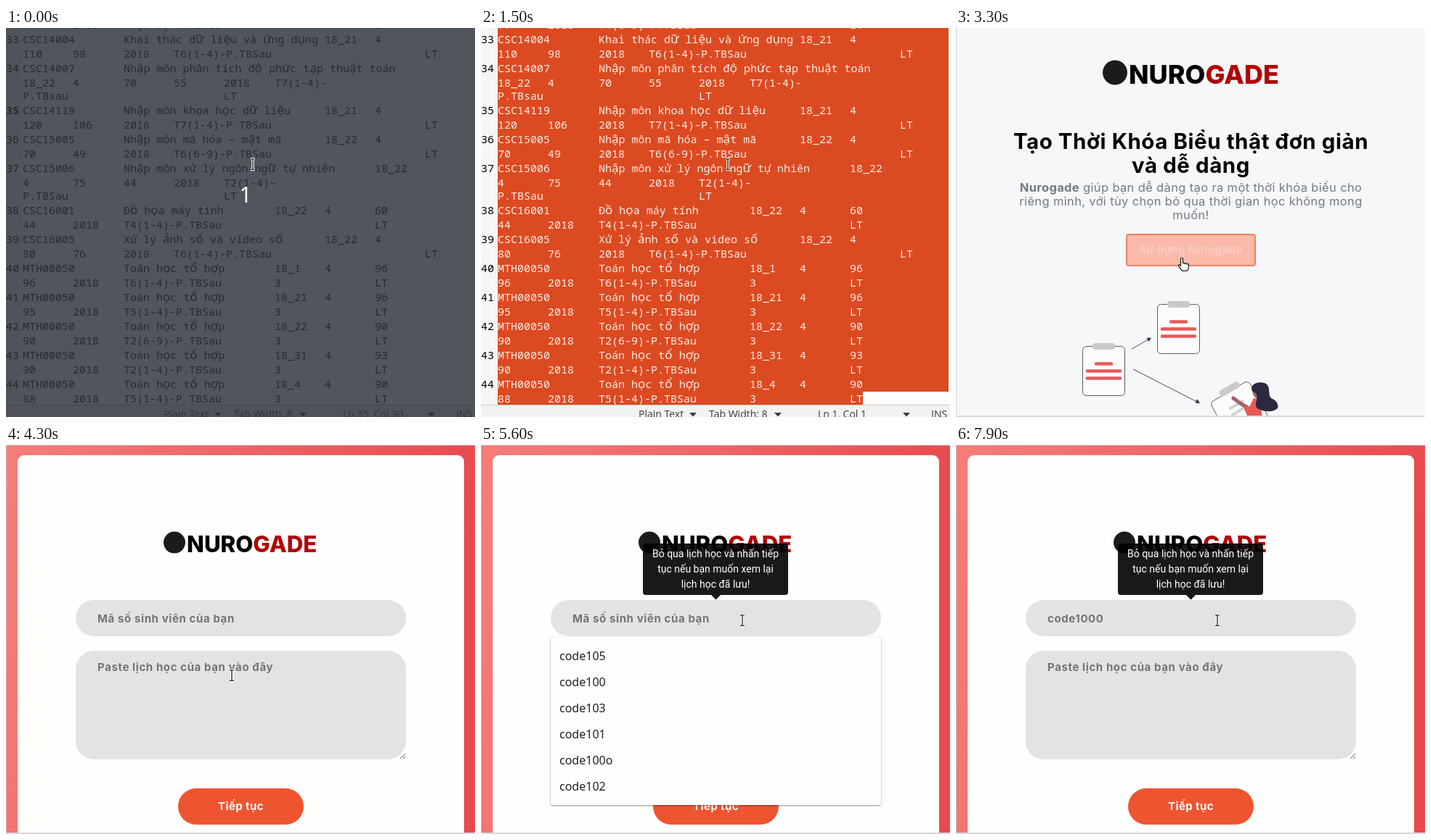
Animation, 646 px wide and 537 px high, one loop 8000 ms. Source, as an HTML page:

```html
<!DOCTYPE html>
<html lang="vi">
<head>
<meta charset="utf-8">
<title>Thời khóa biểu</title>
<style>
html, body { margin: 0; width: 100%; height: 100%; overflow: hidden; background: #fff; }
svg { display: block; width: 646px; height: 537px; }
text { white-space: pre; }
.mono { font: 500 15px "Noto Sans Mono", monospace; }
.mono .vn { font: 500 17px "Noto Sans", sans-serif; }
.bar { font: 500 14px "Open Sans", sans-serif; fill: #3c3c3c; }
.page { font-family: Inter, sans-serif; }
.logo { font-weight: 800; }
.title { font-size: 29.5px; font-weight: 700; letter-spacing: .55px; text-anchor: middle; }
.lead { font-size: 16.5px; letter-spacing: .35px; text-anchor: middle; fill: #737b82; }
.field { font-size: 15px; font-weight: 700; letter-spacing: .6px; fill: #737478; }
.btn { font-size: 15px; font-weight: 700; letter-spacing: .4px; text-anchor: middle; }
.tip { font: 14px Roboto, sans-serif; text-anchor: middle; fill: #fff; }
.item { font: 500 16px "Noto Sans", sans-serif; fill: #202124; }
</style>
</head>
<body>
<svg id="stage" viewBox="0 0 646 537"></svg>
<script>
const LOOP = 8000, STEP = 100, ORANGE = '#ef5430';
const stage = document.getElementById('stage');
const $ = id => document.getElementById(id);

const rect = (x, y, w, h, fill, rx = 0, more = '') =>
  `<rect x="${x}" y="${y}" width="${w}" height="${h}" rx="${rx}" fill="${fill}" ${more}/>`;
const text = (x, y, s, cls = '', more = '') =>
  `<text x="${x}" y="${y}" class="${cls}" ${more}>${s}</text>`;
const path = (d, more = 'fill="none"') => `<path d="${d}" ${more}/>`;

// ---- text editor: each cell starts with its tab column ----
const ROWS = [
  '33#0CSC14004|2Khai thác dữ liệu và ứng dụng|618_21|74',
  '0110|198|22018|3T6(1-4)-P.TBSau|8LT',
  '34#0CSC14007|2Nhập môn phân tích độ phức tạp thuật toán',
  '018_22|14|270|355|42018|5T7(1-4)-',
  '0P.TBsau|4LT',
  '35#0CSC14119|2Nhập môn khoa học dữ liệu|618_21|74',
  '0120|1106|22018|3T7(1-4)-P.TBSau|8LT',
  '36#0CSC15005|2Nhập môn mã hóa – mật mã|618_22|74',
  '070|149|22018|3T6(6-9)-P.TBSau|8LT',
  '37#0CSC15006|2Nhập môn xử lý ngôn ngữ tự nhiên|718_22',
  '04|175|244|32018|4T2(1-4)-',
  '0P.TBSau|4LT',
  '38#0CSC16001|2Đồ họa máy tính|518_22|64|760',
  '044|12018|2T4(1-4)-P.TBSau|7LT',
  '39#0CSC16005|2Xử lý ảnh số và video số|618_22|74',
  '080|176|22018|3T6(1-4)-P.TBSau|8LT'
];
[['18_1', 96, 96, 'T6(1-4)'], ['18_21', 96, 95, 'T5(1-4)'], ['18_22', 90, 90, 'T2(6-9)'],
 ['18_31', 93, 90, 'T2(1-4)'], ['18_4', 90, 88, 'T5(1-4)']].forEach(([group, max, now, slot], i) =>
  ROWS.push(`${40 + i}#0MTH00050|2Toán học tổ hợp|5${group}|64|7${max}`,
            `0${now}|12018|2${slot}-P.TBSau|53|7LT`));

const viet = s => s.replace(/[ậạộệứụọổợảốồữ]/g, '<tspan class="vn">$&</tspan>');
const cells = (row, y) => row.split('|').map(c =>
  text(Math.round(23 + 69.3 * c[0]), y, viet(c.slice(1)))).join('');

function editor() {
  let y = 1, body = cells('077|12018|2T4(6-9)-P.TBSau|7LT', y), nums = '';
  for (const row of ROWS) {
    y += row.startsWith('0P.') ? 18 : 20;
    const [num, rest] = row.includes('#') ? row.split('#') : ['', row];
    if (num) nums += text(0, y, num, '', `id="n${num}"`);
    body += cells(rest, y);
  }
  const arrow = x => path(`M${x} 531h10l-5 5.5z`, 'fill="#3c3c3c"');
  return `<g id="editor">${rect(0, 0, 646, 537, '#fefefe') + rect(0, 0, 21, 520, '#f7f6f5')}
    <rect id="band" x="0" width="646" fill="#edecea"/>
    <path id="sel" d="M23 0H644V502H526V520H23z" fill="#dc4a21"/>
    <g class="mono">${nums}<g id="code">${body}</g></g>
    ${rect(343.4, 185, 1.2, 19, '#111', 0, 'id="edCaret"')}
    ${rect(0, 520, 646, 17, '#f3f2f0') + rect(0, 520, 646, 1, '#cdc9c4')}
    <g class="bar">${text(217, 538, 'Plain Text') + text(314, 538, 'Tab Width: 8') +
      text(464, 538, '', '', 'id="pos"') + text(620, 538, 'INS')}</g>
    ${arrow(287) + arrow(404) + arrow(581)}
    <g id="dim">${rect(0, 0, 646, 537, '#2b3139', 0, 'opacity=".82"')}
      ${text(330, 241, '1', '', 'font-family="Noto Sans, sans-serif" font-size="30" fill="#fff" text-anchor="middle"')}</g>
  </g>`;
}

const logo = (x, y, size, r) => `<circle cx="${x - r - 2}" cy="${y - size * .43}" r="${r}" fill="#1c1a1a"/>` +
  text(x, y, 'NURO<tspan fill="#b00508">GADE</tspan>', 'logo', `font-size="${size}"`);

// ---- landing page ----
const board = (x, y) => `<g transform="translate(${x} ${y})">
  ${rect(.5, 4.5, 58, 68, '#fbfbfc', 5, 'stroke="#5a5a66"') + rect(14, 0, 31, 9, '#c9c9c9', 4)}
  ${path('M19 28.500h21M7 38.500h45M7 48.500h45', 'stroke="#e85a58" stroke-width="4.500" stroke-linecap="round"')}</g>`;

function landing() {
  return `<g id="landing" class="page">${rect(0, 0, 646, 537, '#f6f7f9') + rect(0, 0, 1, 537, '#d6d8db')}
    ${logo(238, 77, 36, 17)}
    ${text(323.5, 167, 'Tạo Thời Khóa Biểu thật đơn giản', 'title')}
    ${text(323.5, 200, 'và dễ dàng', 'title')}
    ${text(323.5, 225.5, '<tspan font-weight="700">Nurogade</tspan> giúp bạn dễ dàng tạo ra một thời khóa biểu cho', 'lead')}
    ${text(323.5, 244.5, 'riêng mình, với tùy chọn bỏ qua thời gian học không mong', 'lead')}
    ${text(323.5, 263.5, 'muốn!', 'lead')}
    ${rect(235, 285, 177, 43, '#ff7551', 3, 'id="cta" stroke="#f1805f" stroke-width="2"')}
    ${text(323.5, 311, 'Sử dụng Nurogade', 'btn', 'id="ctaText"')}
    ${board(277, 377) + board(174, 435)}
    ${path('M242 443L264 430.500M244 471L331 515.500', 'stroke="#4a4a58"')}
    ${path('M269 427.500l-3.500 5.500-3-5zM336 518l-6.500-.5 2.800-5.200z', 'fill="#2f2e41"')}
    ${path('M362 540L352 521Q351 517 354 515L398 489Q402 487 405 491L432 540z', 'fill="#fbfbfc" stroke="#5a5a66"')}
    ${rect(-15, -4.5, 30, 9, '#c9c9c9', 4, 'transform="translate(376.5 498.500) rotate(-30)"')}
    ${path('M378 525l17-10M381 534l20-12', 'stroke="#d2d2d4" stroke-width="4" stroke-linecap="round"')}
    ${path('M382 511l8 6 13 8', 'fill="none" stroke="#a0616a" stroke-width="5" stroke-linecap="round" stroke-linejoin="round"')}
    ${path('M399 521L404 523 410 511 418 512 422 537H402L397 526z', 'fill="#e85a58"')}
    ${path('M408 498q0 9 5 13l6-6-3-8z', 'fill="#a0616a"')}
    ${path('M407 497C408 490 419 487 427 491C434 496 429 505 434 511C441 514 445 519 443 525C437 531 422 530 415 525C410 519 416 512 414 506C412 502 407 503 407 497z', 'fill="#2b2940"')}
    ${rect(0, 535, 646, 2, '#d9dbde')}</g>`;
}

// ---- form page ----
function form() {
  const tips = ['Bỏ qua lịch học và nhấn tiếp', 'tục nếu bạn muốn xem lại', 'lịch học đã lưu!'];
  const items = [0, 1, 2, 3, 4, 5].map(i => text(108, 297 + 36 * i, '', 'item', `id="item${i}"`)).join('');
  return `<g id="form" class="page">${rect(0, 0, 646, 537, 'url(#red)')}
    ${path('M0 .5H646M.5 0V537', 'stroke="#d9a5a5"')}
    ${rect(16, 14, 615, 540, '#fefefd', 9) + logo(249, 148, 31.2, 15)}
    ${rect(96, 214, 455, 50, '#e5e3e2', 25) + rect(96, 284, 455, 150, '#e5e3e2', 25)}
    ${text(126, 245, '', 'field', 'id="typed"') + text(126, 312, 'Paste lịch học của bạn vào đây', 'field')}
    ${path('M543 433l7-7M547 433l3-3', 'stroke="#555"')}
    ${rect(237, 474, 173, 50, ORANGE, 25) + text(323.5, 504, 'Tiếp tục', 'btn', 'fill="#fff"')}
    ${rect(126, 230, 1, 19, '#333', 0, 'id="caret"')}
    <g id="tip">${path('M227 136H419Q423 136 423 140V203Q423 207 419 207H330L323.500 213.500 317 207H227Q223 207 223 203V140Q223 136 227 136z', 'opacity=".9"')}
      ${tips.map((s, i) => text(323, 155 + 21 * i, s, 'tip')).join('')}</g>
    <g id="list">${rect(96, 265, 455, 232, '#fefefe', 2, 'filter="url(#shade)"') + items}</g>
    ${rect(0, 535, 646, 2, '#d9d6d9')}</g>`;
}

const BEAM = 'M-3 -7.500Q0 -7.500 0 -6Q0 -7.500 3 -7.500M0 -6V6M-3 7.500Q0 7.500 0 6Q0 7.500 3 7.500';
const HAND = 'M-1.500 1c0-2 3-2 3 0v6c.5-1 2.500-1 2.800.3c.6-.9 2.500-.7 2.700.6c.7-.7 2.400-.3 2.400 1.200v3c0 3-1.500 4.500-2 5h-7c-1-2-4-4.500-5-6.500c-.7-1.500 1.200-2.300 2.200-1.200l.9 1z';

stage.innerHTML = `<defs>
  <linearGradient id="red" x2="1" y2=".15"><stop stop-color="#f67d79"/><stop offset="1" stop-color="#e94a4e"/></linearGradient>
  <filter id="shade" x="-5%" y="-5%" width="110%" height="112%"><feDropShadow dx="0" dy="1" stdDeviation="1.300" flood-opacity=".45"/></filter>
  </defs>${editor() + landing() + form()}
  <g id="mouse"><g id="beam" fill="none">${path(BEAM, 'stroke="#fff" stroke-width="3.500"') + path(BEAM, 'stroke="#111" stroke-width="1.200"')}</g>
  ${path(HAND, 'id="hand" fill="#fff" stroke="#111" stroke-width="1.200"')}
  ${path('M0 0V15L3.500 11.800 6 17 8.300 16 6 10.800H10.500z', 'id="arrow" fill="#111" stroke="#fff"')}</g>`;

// ---- timeline ----
const TYPED = [[0, ''], [5800, 'co'], [6000, 'cod'], [6200, 'code'], [6400, 'code1'],
  [6700, 'code100'], [6800, 'code1000']];
const LISTS = [[0, '105 100 103 101 100o 102'], [5800, '103 105 100o 100 101 102'],
  [6500, '100 101 105 100o 102 103']];
const MOUSE = [[0, 340, 188], [2900, 340, 188], [3300, 311, 318], [4300, 311, 318], [4800, 360, 242], [LOOP, 360, 242]];

const clamp = v => Math.max(0, Math.min(1, v));
const ramp = (t, a, b) => clamp((t - a) / (b - a));
const at = (table, t) => table.filter(k => k[0] <= t).pop()[1];
const show = (id, on) => $(id).style.display = on ? '' : 'none';
const set = (id, attrs) => { for (const k in attrs) $(id).setAttribute(k, attrs[k]); };

function moveMouse(t, page) {
  const i = MOUSE.findIndex(k => k[0] > t), [t0, x0, y0] = MOUSE[i - 1], [t1, x1, y1] = MOUSE[i];
  const p = ramp(t, t0, t1), e = p * p * (3 - 2 * p);
  const x = x0 + (x1 - x0) * e, y = y0 + (y1 - y0) * e;
  set('mouse', { transform: `translate(${x} ${y})` });
  const hand = page === 1 && y >= 284;
  const arrow = page === 1 ? y > 266 && y < 284 : page === 2 && y > 264 && y < 284;
  show('hand', hand);
  show('arrow', arrow);
  show('beam', !hand && !arrow);
}

function drawEditor(t) {
  const all = t >= 1500, line = t < 400 ? 35 : 37;
  show('dim', t < 100);
  show('sel', all);
  show('band', !all && t >= 100);
  show('edCaret', !all && line === 37);
  set('band', line === 35 ? { y: 104, height: 40 } : { y: 182, height: 58 });
  set('code', { fill: all ? '#fbeee8' : '#111' });
  for (const n of [35, 37]) set('n' + n, { 'font-weight': !all && n === line ? 700 : 500 });
  $('pos').textContent = all ? 'Ln 1, Col 1' : line === 35 ? 'Ln 35, Col 30' : 'Ln 37, Col 37';
}

function drawLanding(t) {
  const p = ramp(t, 3070, 3560), q = clamp(p * 1.5);
  set('cta', { 'fill-opacity': p });
  set('ctaText', { fill: `rgb(${[239, 84, 48].map(c => Math.round(c + (255 - c) * q))})` });
}

function drawForm(t) {
  const value = at(TYPED, t), low = t >= 7400;
  $('typed').textContent = value || 'Mã số sinh viên của bạn';
  set('typed', { fill: value ? '#626266' : '#737478' });
  set('tip', { opacity: ramp(t, 4400, 4800) });
  show('list', t >= 5200 && t < 7000);
  set('list', { opacity: 1 - ramp(t, 6700, 7000) });
  at(LISTS, t).split(' ').forEach((n, i) => $('item' + i).textContent = 'code' + n);
  show('caret', t >= 5200 && t < 7900 && !(t >= 5600 && t < 5800));
  const x = value && !low ? 126 + $('typed').getComputedTextLength() : 126;
  set('caret', { x: Math.round(x), y: low ? 298 : 230 });
}

function frame(now) {
  const t = Math.floor(now % LOOP / STEP) * STEP;
  const page = t < 2300 ? 0 : t < 4300 ? 1 : 2;
  ['editor', 'landing', 'form'].forEach((id, i) => show(id, i === page));
  [drawEditor, drawLanding, drawForm][page](t);
  moveMouse(t, page);
}

const start = performance.now();
(function tick() {
  frame(performance.now() - start);
  requestAnimationFrame(tick);
})();
</script>
</body>
</html>
```
